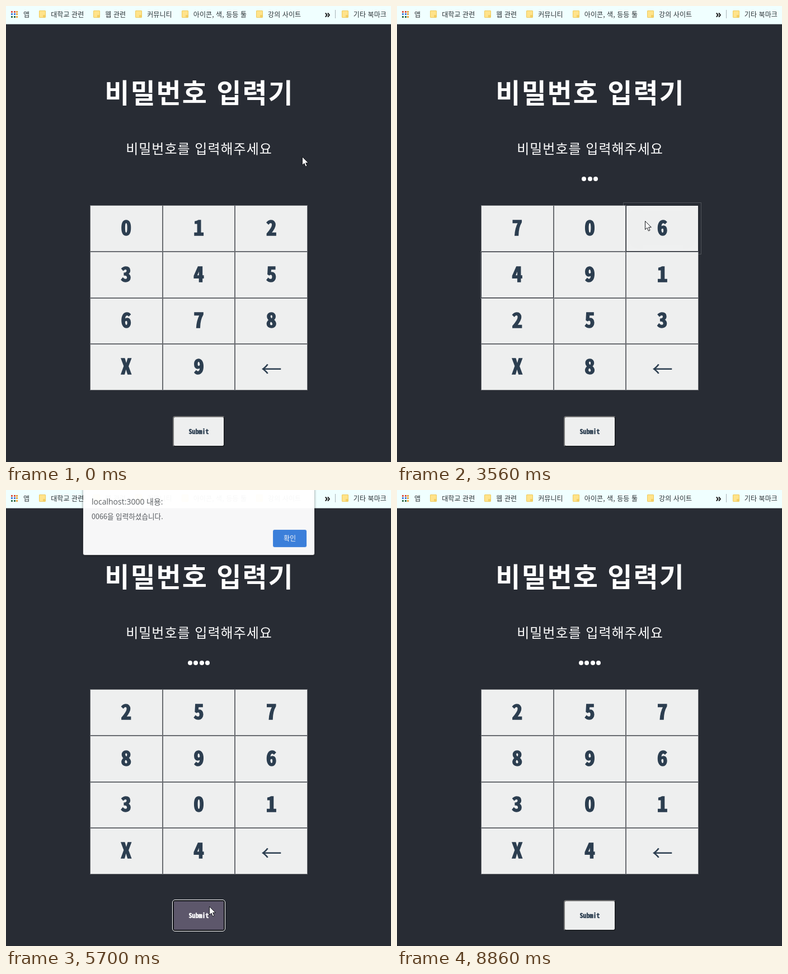
Animation, 688 px wide and 815 px high, one loop 8.94 s. Source, as an HTML page:

```html
<!DOCTYPE html>
<html lang="ko">
<head>
<meta charset="utf-8">
<title>비밀번호 입력기</title>
<style>
  html, body { margin: 0; width: 100%; height: 100%; overflow: hidden; background: #282c34; }
  body { position: relative; font-family: "Noto Sans CJK KR", "Noto Sans CJK", sans-serif; color: #fff; }
  body > * { position: absolute; box-sizing: border-box; white-space: nowrap; }

  #bar {
    left: 0; top: 0; width: 100%; height: 33px; padding: 0 8px 3px 9px; display: flex; align-items: center;
    background: #f0ffff; border-bottom: 1px solid #98a2a6; color: #2c3236; font-size: 12px; letter-spacing: .1px;
  }
  #bar .apps { width: 12px; height: 12px; margin-right: 10px; display: grid; grid-template-columns: repeat(3, 3px); gap: 1.5px; }
  #bar .apps b { height: 3px; }
  #bar span { margin-left: 17px; display: flex; align-items: center; }
  #bar span::before {
    content: ""; box-sizing: border-box; width: 12px; height: 13px; margin-right: 9px; border-radius: 1px;
    border: 1px solid #efca5c; background: linear-gradient(#f3cf66, #f3cf66) 100% 100% / 4px 4px no-repeat #ffe38a;
  }
  #bar em { margin-left: auto; padding-right: 8px; border-right: 1px solid #a9b4b8; font: 700 17px/15px "Open Sans", sans-serif; color: #222; }
  #bar em + span { margin-left: 11px; }

  h1, h2 { left: 0; width: 100%; margin: 0; text-align: center; }
  h1 { top: 122px; font-size: 48px; line-height: 60px; letter-spacing: 2px; text-indent: 3px; }
  h2 { top: 239px; font-size: 24px; line-height: 30px; font-weight: 400; letter-spacing: 1px; text-indent: 2px; }

  #dots { left: 0; top: 305px; width: 689px; display: flex; justify-content: center; gap: 2.3px; }
  #dots u { width: 8px; height: 8px; border-radius: 50%; background: #fff; }

  #pad {
    left: 151px; top: 357px; width: 387px; height: 329px;
    display: grid; grid-template: repeat(4, 1fr) / repeat(3, 1fr); gap: 2px;
  }
  #pad div, #submit {
    --p: 0; display: flex; align-items: center; justify-content: center; background: #eeefef; color: #2c3e50;
    font-family: "Noto Sans Mono CJK KR", "Noto Sans CJK KR", monospace; font-feature-settings: "hwid"; font-weight: 700;
  }
  #pad div {
    position: relative; z-index: 0; padding-bottom: 7px; font-size: 37px; -webkit-text-stroke: 1.5px;
    outline: 1px solid rgba(255, 255, 255, calc(.3 * (1 - var(--p))));
    outline-offset: calc(var(--p) * 15px);
    box-shadow: inset 0 0 20px rgba(255, 255, 255, calc(.5 * var(--p)));
    text-shadow: calc(var(--p) * 1px) calc(var(--p) * 1px) calc(var(--p) * 2px) rgba(66, 115, 136, var(--p));
  }
  #pad .arrow { padding: 2px 0 0; font: 500 37px "Noto Sans CJK KR", sans-serif; -webkit-text-stroke: 0; }

  #submit {
    left: 298px; top: 733px; width: 93px; height: 55px; padding-bottom: 2px; font-size: 12px; -webkit-text-stroke: .4px;
    border: 2px solid; border-color: #767676 #1d2025 #1d2025 #767676; border-radius: 4px;
    box-shadow: inset 0 0 0 calc(var(--p) * 30px) rgba(93, 87, 107, var(--p));
    color: color-mix(in srgb, #fff calc(var(--p) * 100%), #2c3e50);
  }
  #submit.focus { border-color: #0c0e12; outline: 1px solid #fff; }

  #alert {
    left: 138px; top: -3px; width: 413px; height: 120px; background: #fff; border-radius: 3px;
    box-shadow: 0 1px 4px rgba(0, 0, 0, .5); color: #54585c; transform-origin: 50% 0;
  }
  #alert > * { position: absolute; left: 15px; margin: 0; line-height: 20px; }
  #alert .host { top: 15px; font: 14px/20px "Open Sans", "Noto Sans CJK KR", sans-serif; }
  #alert .msg { top: 41px; font-size: 12.6px; }
  #alert .ok {
    left: 339px; top: 75px; width: 60px; height: 31px; border-radius: 3px; background: #3b82e0;
    color: #fff; font-size: 12px; line-height: 30px; text-align: center;
  }
  #cursor { left: 0; top: 0; overflow: visible; }
</style>
</head>
<body>
<div id="bar">
  <div class="apps"></div>앱
  <span>대학교 관련</span><span>웹 관련</span><span>커뮤니티</span>
  <span>아이콘, 색, 등등 툴</span><span>강의 사이트</span>
  <em>»</em><span>기타 북마크</span>
</div>
<h1>비밀번호 입력기</h1>
<h2>비밀번호를 입력해주세요</h2>
<div id="dots"></div>
<div id="pad"></div>
<div id="submit">Submit</div>
<div id="alert">
  <p class="host">localhost:3000 내용:</p>
  <p class="msg">0066을 입력하셨습니다.</p>
  <div class="ok">확인</div>
</div>
<svg id="cursor" width="13" height="20">
  <path d="M.5 .5V15.5L4 12.3L6.4 18L9 16.9L6.6 11.4H11.3Z" fill="#fff" stroke="#16181c"/>
</svg>

<script>
const LOOP = 8940, GLIDE = 1250;
const $ = id => document.getElementById(id);
const clamp = v => Math.min(1, Math.max(0, v));
const easeOut = u => 1 - (1 - clamp(u)) ** 2;

const rowColors = ["#d9503f", "#3f78d8", "#2f6b48"];
for (let i = 0; i < 9; i++) {
  const square = $("bar").querySelector(".apps").appendChild(document.createElement("b"));
  square.style.background = i % 3 === 2 ? "#e8a13a" : rowColors[Math.floor(i / 3)];
}

const keys = [..."012345678X9←"].map(label => {
  const key = $("pad").appendChild(document.createElement("div"));
  key.textContent = label;
  return key;
});
keys[11].className = "arrow";
const digitKeys = keys.filter((_, i) => i !== 9 && i !== 11);

// Digits are reshuffled after each click
const layouts = ["0123456789", "1073982546", "1846309275", "7064912538", "2578963014"];
const clicks = [1270, 2340, 3250, 4170];

// Pointer moves: departure, arrival, x, y
const moves = [
  [0, 0, 529, 269], [130, 830, 225, 372], [1000, 1120, 214, 391],
  [1330, 1430, 357, 391], [1660, 1960, 344, 391], [2120, 2190, 356, 382],
  [2420, 2800, 225, 474], [3190, 3550, 443, 384],
  [4330, 4420, 465, 470], [4560, 4680, 352, 425], [4850, 5010, 367, 564],
  [5070, 5360, 363, 744], [5780, 6520, 493, 83],
  [7400, 7680, 515, 220], [7850, 8250, 630, 440], [8250, 8710, 394, 830],
];

function keyAt(x, y) {
  const col = Math.floor((x - 150) / 129.67), row = Math.floor((y - 356) / 82.75);
  return col >= 0 && col < 3 && row >= 0 && row < 4 ? row * 3 + col : -1;
}

// A key loses hover when the pointer departs; the next gains it late in the move
const turns = keys.map(() => []);
let over = -1;
for (const [depart, arrive, x, y] of moves) {
  const next = keyAt(x, y);
  if (next === over) continue;
  if (over >= 0) turns[over].push([depart, 0]);
  if (next >= 0) turns[next].push([depart + (arrive - depart) * .75, 1]);
  over = next;
}

// cubic-bezier(.19, 1, .22, 1)
function expo(x) {
  const curve = (s, a, b) => 3 * (1 - s) ** 2 * s * a + 3 * (1 - s) * s * s * b + s ** 3;
  let lo = 0, hi = 1;
  for (let i = 0; i < 18; i++) {
    const mid = (lo + hi) / 2;
    if (curve(mid, .19, .22) < x) lo = mid; else hi = mid;
  }
  return curve(lo, 1, 1);
}

function hoverAmount(key, t) {
  let from = 0, to = 0, start = 0;
  const value = now => from + (to - from) * expo(clamp((now - start) / GLIDE));
  for (const [at, goal] of turns[key]) {
    if (t >= at) [from, to, start] = [value(at), goal, at];
  }
  return value(t);
}

function pointer(t) {
  let [, , x, y] = moves[0];
  for (const [depart, arrive, toX, toY] of moves.slice(1)) {
    const u = easeOut((t - depart) / (arrive - depart));
    x += (toX - x) * u;
    y += (toY - y) * u;
  }
  return [x, y];
}

let shown = -1;

function draw(t) {
  const count = clicks.filter(c => t >= c).length;
  if (count !== shown) {
    shown = count;
    digitKeys.forEach((key, i) => key.textContent = layouts[count][i]);
    $("dots").innerHTML = "<u></u>".repeat(count);
  }
  keys.forEach((key, i) => {
    const p = hoverAmount(i, t);
    key.style.setProperty("--p", p < .03 ? 0 : p.toFixed(4));
  });

  const press = easeOut((t - 5270) / 250) - easeOut((t - 7150) / 250);
  $("submit").style.setProperty("--p", press.toFixed(4));
  $("submit").classList.toggle("focus", t >= 5480 && t < 8860);

  const seen = easeOut((t - 5540) / 200) - clamp((t - 7200) / 280) ** 2;
  $("alert").style.opacity = seen;
  $("alert").style.transform = `translateY(${-25 * (1 - seen)}px) perspective(900px) rotateX(${9 * (1 - seen)}deg)`;

  const [x, y] = pointer(t);
  $("cursor").style.transform = `translate(${Math.round(x)}px, ${Math.round(y)}px)`;
}

const began = performance.now();
function tick() {
  draw((performance.now() - began) % LOOP);
  requestAnimationFrame(tick);
}
tick();
</script>
</body>
</html>
```
